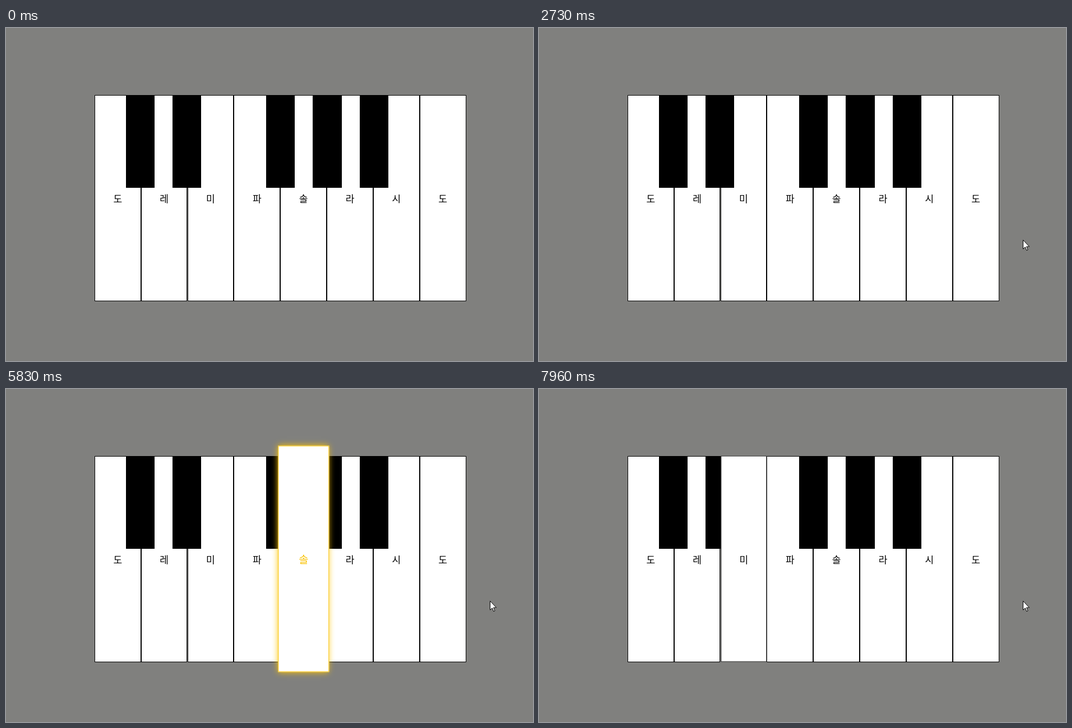
Animation of 940x596 px, one loop 8 s. Source, as an HTML page:

```html
<!DOCTYPE html>
<html lang="ko">
<head>
<meta charset="utf-8">
<title>Piano</title>
<style>
  html, body { margin: 0; width: 100%; height: 100%; overflow: hidden; background: #80807e; }
  #stage { position: relative; width: 940px; height: 596px; overflow: hidden; background: #80807e; }
  .white, .black { position: absolute; box-sizing: border-box; top: 119.6px; }
  .white {
    width: 82.85px; height: 369px; padding-top: 1px;
    display: flex; align-items: center; justify-content: center;
    background: #fff; border: 1px solid #000; color: #000;
    font: 300 17px/24px "Noto Sans CJK KR", "Noto Sans CJK", "Noto Sans CJK JP", sans-serif;
  }
  .black { width: 51.4px; height: 166px; background: #000; z-index: 1; }
  #cursor { position: absolute; left: 0; top: 0; z-index: 3; visibility: hidden; }
</style>
</head>
<body>
<div id="stage">
  <svg id="cursor" width="14" height="22" viewBox="0 0 14 22">
    <path d="M.5 .5V16.5L4.2 13L6.8 19L9 18L6.5 12.2H11.5Z" fill="#fff" stroke="#000"/>
  </svg>
</div>
<script>
  const LOOP = 8000, RISE = 100, TICK = 68.84, ORIGIN = 1420;
  const stage = document.getElementById('stage');
  const cursor = document.getElementById('cursor');

  function addKey(type, left, label) {
    const key = document.createElement('div');
    key.className = type;
    key.style.left = left + 'px';
    key.textContent = label;
    stage.append(key);
    return key;
  }

  const keys = [...'도레미파솔라시도'].map((name, i) => addKey('white', 157.8 + 82.85 * i, name));
  [0, 1, 3, 4, 5].forEach(i => addKey('black', 213.6 + 83.4 * i, ''));

  // Press times per key; "raised" is a span where a key stays on top after its press.
  const presses = [
    [1372], [1795], [2142, 7730], [2490],
    [2886, ...Array.from({ length: 11 }, (_, i) => 5343 + 189.5 * i)],
    [3299], [3643], [4133]
  ];
  const raised = { 2: [7730, LOOP], 4: [7238, 7680] };

  // cubic-bezier(.25, .1, .25, 1)
  function ease(x) {
    const curve = (s, a, b) => 3 * s * (1 - s) * (1 - s) * a + 3 * s * s * (1 - s) * b + s * s * s;
    let lo = 0, hi = 1;
    for (let i = 0; i < 20; i++) {
      const mid = (lo + hi) / 2;
      if (curve(mid, .25, .25) < x) lo = mid; else hi = mid;
    }
    return curve(lo, .1, 1);
  }

  function pressLevel(age) {
    if (age < 0 || age >= 2 * RISE) return 0;
    return age < RISE ? ease(age / RISE) : 1 - ease(age / RISE - 1);
  }

  function drawKey(key, i, t) {
    const start = presses[i].filter(p => p <= t).pop();
    const age = start === undefined ? Infinity : t - start;
    const span = raised[i];
    const onTop = age < 2 * RISE || (span && t >= span[0] && t < span[1]);
    const f = pressLevel(age);
    const color = `rgb(${255 * f}, ${198 * f}, 0)`;
    Object.assign(key.style, {
      zIndex: onTop ? 2 : 0,
      transform: onTop ? `translate(.3px, -.5px) scale(${1 + .1 * f})` : 'none',
      color,
      borderColor: color,
      boxShadow: f ? `0 0 ${10 * f}px rgba(255, 198, 0, ${f})` : 'none'
    });
  }

  function drawCursor(t) {
    const u = Math.min(1, Math.max(0, (t - 525) / 619)), v = 1 - u;
    const x = Math.round(863 - 26 * v * v);
    const y = Math.round(v * v * 427 + 2 * u * v * 339 + u * u * 379);
    cursor.style.visibility = t >= 510 ? 'visible' : 'hidden';
    cursor.style.transform = `translate(${x}px, ${y}px)`;
  }

  function draw() {
    const now = performance.now() % LOOP;
    // The picture advances in even ticks.
    const t = ORIGIN + Math.floor((now - ORIGIN + 26) / TICK) * TICK;
    keys.forEach((key, i) => drawKey(key, i, t));
    drawCursor(t);
    requestAnimationFrame(draw);
  }
  draw();
</script>
</body>
</html>
```
